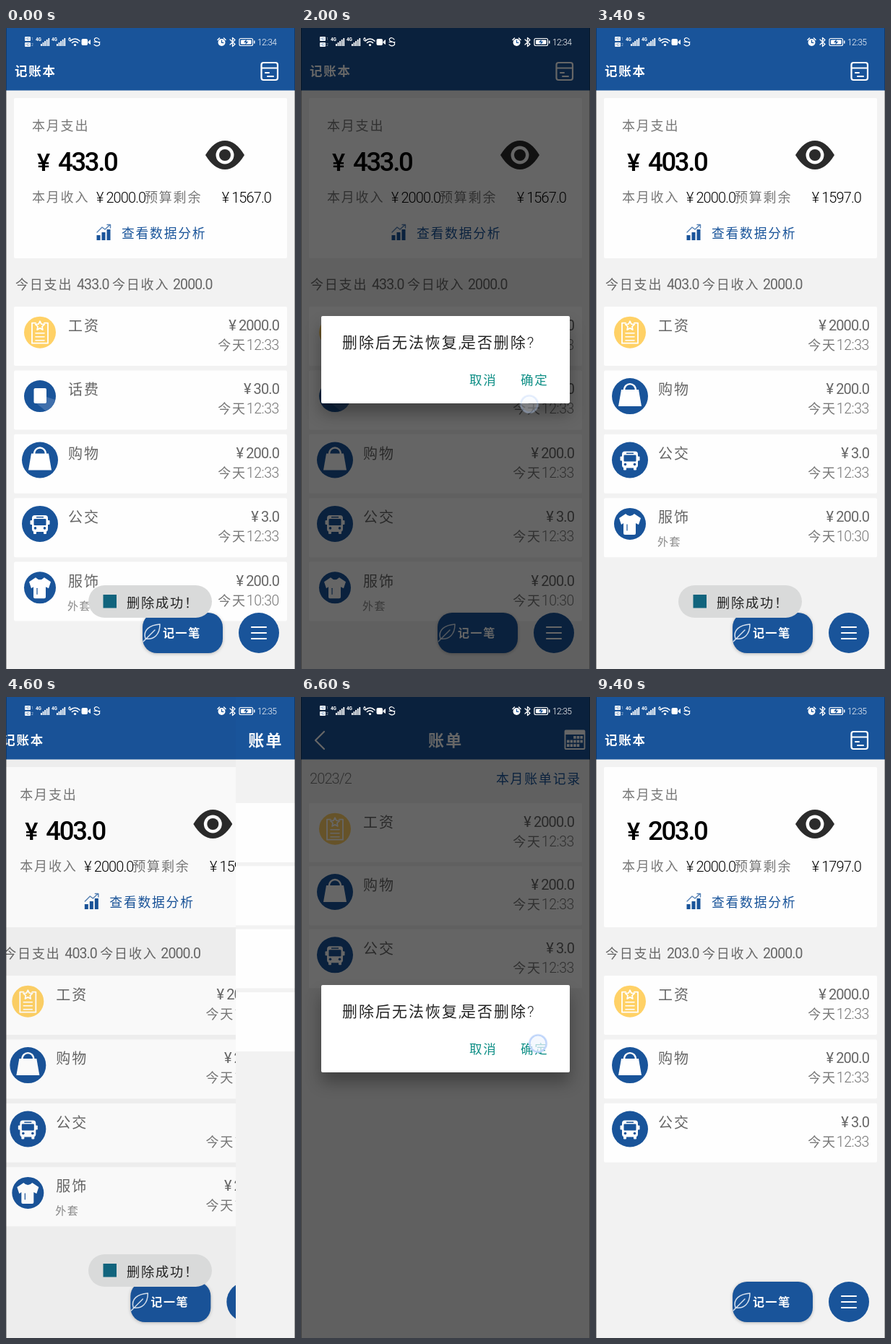
Write an HTML page that moves like this. It is 400 px wide and 888 px high and loops after 10 s.

```html
<!DOCTYPE html>
<html lang="zh">
<head>
<meta charset="utf-8">
<title>记账本</title>
<style>
html, body { margin: 0; width: 100%; height: 100%; overflow: hidden; background: #f2f2f2; }
#stage { position: relative; width: 400px; height: 888px; overflow: hidden; }
#stage > div, #bill > div, svg { position: absolute; left: 0; top: 0; width: 400px; height: 888px; }
text { font-family: "Noto Sans CJK SC", "Noto Sans CJK", sans-serif; font-weight: 300; letter-spacing: .1em; white-space: pre; }
.n { font-family: Roboto, sans-serif; letter-spacing: -.045em; }
.big .n { letter-spacing: -.064em; font-weight: 500; }
.date .n { font-size: 1.08em; letter-spacing: -.02em; }
.m { font-weight: 700; }
.r { font-weight: 400; }
.line { fill: none; stroke: #fff; stroke-linecap: round; stroke-linejoin: round; }

#home, #shade, #bill, #bill > div, #dim, #dialog, #toast, #touch, #touch g, #bulge {
  animation: 10s linear infinite;
}

/* account data before and after each deletion */
.first, .second, .third, .shift, .last, .before, .after { animation: 10s step-end infinite; }
.first { animation-name: first; }
.second { animation-name: second; }
.third { animation-name: third; }
.shift { animation-name: shift; }
.last { animation-name: last; }
.before { animation-name: before; }
.after { animation-name: after; }
@keyframes first { 0% { opacity: 1 } 25%, 100% { opacity: 0 } }
@keyframes second { 0% { opacity: 0 } 25% { opacity: 1 } 65.8%, 100% { opacity: 0 } }
@keyframes third { 0% { opacity: 0 } 65.8%, 100% { opacity: 1 } }
@keyframes last { 0% { opacity: 1 } 65.8%, 100% { opacity: 0 } }
@keyframes shift { 0% { transform: none } 25%, 100% { transform: translateY(-88.4px) } }
@keyframes before { 0% { opacity: 1 } 27%, 100% { opacity: 0 } }
@keyframes after { 0% { opacity: 0 } 27%, 100% { opacity: 1 } }

/* page change: the bill page is uncovered from the right, home drifts left */
#home { animation-name: home; }
#shade { animation-name: shade; }
#bill { animation-name: uncover; }
#bill > div { animation-name: slide; }
@keyframes home {
  0%, 45.5% { transform: none; animation-timing-function: cubic-bezier(.2, .2, .1, 1) }
  50.5%, 76.6% { transform: translateX(-82px) }
  77% { transform: translateX(-80px); animation-timing-function: cubic-bezier(.3, .1, .2, 1) }
  82%, 100% { transform: none }
}
@keyframes shade {
  0%, 45.5% { opacity: 0; animation-timing-function: cubic-bezier(.2, .2, .1, 1) }
  50.5%, 77% { opacity: .1; animation-timing-function: cubic-bezier(.3, .1, .2, 1) }
  82%, 100% { opacity: 0 }
}
@keyframes uncover {
  0%, 45.5% { clip-path: inset(0 0 0 400px); animation-timing-function: cubic-bezier(.2, .2, .1, 1) }
  50.5%, 76.6% { clip-path: inset(0 0 0 0px) }
  77% { clip-path: inset(0 0 0 10px); animation-timing-function: cubic-bezier(.3, .1, .2, 1) }
  82%, 100% { clip-path: inset(0 0 0 400px) }
}
@keyframes slide {
  0%, 45.5% { transform: translateX(200px); animation-timing-function: cubic-bezier(.2, .2, .1, 1) }
  50.5%, 76.6% { transform: none }
  77% { transform: translateX(5px); animation-timing-function: cubic-bezier(.3, .1, .2, 1) }
  82%, 100% { transform: translateX(200px) }
}

#dim { background: #000; animation-name: dim; }
@keyframes dim {
  0%, 16.6% { opacity: 0 } 19%, 24.6% { opacity: .6 } 26.8%, 59.6% { opacity: 0 }
  62%, 67% { opacity: .6 } 69.5%, 100% { opacity: 0 }
}
#stage > #dialog {
  left: 28px; top: 399px; width: 344px; height: 121px; background: #fff; border-radius: 2px;
  box-shadow: 0 14px 22px rgba(0, 0, 0, .32); animation-name: dialog;
}
#dialog svg { left: -28px; top: -399px; }
@keyframes dialog {
  0%, 16.6% { opacity: 0; transform: scale(.9) }
  19%, 24.6% { opacity: 1; transform: none }
  26.5% { opacity: 0; transform: none }
  27%, 59.6% { opacity: 0; transform: scale(.9) }
  62%, 67% { opacity: 1; transform: none }
  69%, 100% { opacity: 0; transform: none }
}
#toast { animation-name: toast; }
@keyframes toast {
  0%, 8% { opacity: 1 } 11%, 27.5% { opacity: 0 } 28.8%, 47.5% { opacity: 1 }
  50%, 70% { opacity: 0 } 71.2%, 88% { opacity: 1 } 91%, 99.99% { opacity: 0 } 100% { opacity: 1 }
}
#bulge { animation-name: bulge; transform-origin: 400px 532px; }
@keyframes bulge {
  0%, 73.6% { transform: scaleX(0) } 76.5%, 77.2% { transform: none } 80%, 100% { transform: scaleX(0) }
}
#touch { animation-name: place; }
#touch g { animation-name: press; }
@keyframes place {
  0% { transform: translate(316px, 521px); animation-timing-function: step-end }
  22% { transform: translate(324px, 488px); animation-timing-function: step-end }
  30% { transform: translate(365px, 60px); animation-timing-function: step-end }
  50% { transform: translate(263px, 452px); animation-timing-function: step-end }
  63.5% { transform: translate(328px, 480px); animation-timing-function: step-end }
  70% { transform: translate(397px, 535px); animation-timing-function: step-end }
  74% { transform: translate(397px, 535px); animation-timing-function: ease-out }
  76.5%, 100% { transform: translate(324px, 595px) }
}
@keyframes press {
  0%, 12.8% { opacity: 0 } 12.9%, 19.3% { opacity: 1 } 20% { opacity: .45 } 21%, 22.8% { opacity: 0 }
  22.9%, 24.4% { opacity: 1 } 25.3%, 43.8% { opacity: 0 } 43.9%, 45% { opacity: 1 }
  46%, 54.8% { opacity: 0 } 54.9%, 60.5% { opacity: 1 } 62%, 64.8% { opacity: 0 }
  64.9%, 66.3% { opacity: 1 } 67.4%, 73.8% { opacity: 0 } 73.9%, 77.2% { opacity: 1 } 78%, 100% { opacity: 0 }
}
</style>
</head>
<body>
<div id="stage">
  <div id="home"></div>
  <div id="bill"><div></div></div>
  <div id="dim"></div>
  <div id="dialog"></div>
  <div id="overlay"></div>
</div>
<script>
const BLUE = '#19549a', GRAY = '#777', DARK = '#666', TEAL = '#0f8f86';
const svg = body => `<svg viewBox="0 0 400 888">${body}</svg>`;
const rect = (x, y, w, h, fill, r = 0) =>
  `<rect x="${x}" y="${y}" width="${w}" height="${h}" rx="${r}" fill="${fill}"/>`;
const disc = (x, y, r, fill) => `<circle cx="${x}" cy="${y}" r="${r}" fill="${fill}"/>`;
const fill = (d, color) => `<path d="${d}" fill="${color}"/>`;
const line = (d, w = 2, color = '#fff') =>
  `<path class="line" d="${d}" stroke-width="${w}" style="stroke:${color}"/>`;
const group = (body, cls = '') => `<g class="${cls}">${body}</g>`;
const at = (x, y, body) => `<g transform="translate(${x} ${y})">${body}</g>`;
const text = (x, y, s, size, color, cls = '', anchor = 'start') =>
  `<text x="${x}" y="${y}" font-size="${size}" fill="${color}" class="${cls}" text-anchor="${anchor}">` +
  s.replace(/[ -~¥]+/g, '<tspan class="n">$&</tspan>') + '</text>';

const star = [...Array(10)].map((_, i) => {
  const r = i % 2 ? 3.2 : 6.5, a = Math.PI * (i / 5 - .5);
  return `${(r * Math.cos(a)).toFixed(1)} ${(r * Math.sin(a) - 9).toFixed(1)}`;
}).join('L');

const icons = {
  salary: disc(0, 0, 22, '#ffd166') + line('M-6-13H-11V15H11V-13H6', 1.8) + line(`M${star}Z`, 1.8) +
    line('M-6 1H6M-6 6H6M-6 11H6', 1.6),
  phone: disc(0, 0, 22, BLUE) + fill('M9 1L21 5A22 22 0 0 1 8 20.5L-5 10Z', '#3f6fac') +
    rect(-8.5, -11, 17.5, 21, '#fff', 2),
  bag: disc(0, 0, 25, BLUE) + fill('M-12-9H12L16 14H-16Z', '#fff') + line('M-8-8C-8-20 8-20 8-8', 2.4),
  bus: disc(0, 0, 25, BLUE) + rect(-11, -12, 22, 23, '#fff', 4) + rect(-13.5, -5, 27, 6, '#fff', 1) +
    rect(-8.5, -7, 17, 9, BLUE, 1) + rect(-5, -10, 10, 1.5, BLUE) + disc(-6.5, 6, 1.8, BLUE) +
    disc(6.5, 6, 1.8, BLUE) + rect(-9, 10, 4, 4, '#fff', 1) + rect(5, 10, 4, 4, '#fff', 1),
  shirt: disc(0, 0, 22, BLUE) +
    fill('M-6-14Q0-8 6-14L15-8L12 1L8-1V13Q8 15 6 15H-7Q-9 15-9 13V-1L-12 1L-15-8Z', '#fff') +
    line('M-4 1V9', 1.2, BLUE)
};

const entries = [
  ['salary', '工资', '2000.0', '12:33'],
  ['phone', '话费', '30.0', '12:33'],
  ['bag', '购物', '200.0', '12:33'],
  ['bus', '公交', '3.0', '12:33'],
  ['shirt', '服饰', '200.0', '10:30', '外套']
];
const row = ([icon, name, sum, time, note], y) => at(0, y,
  rect(11, 0, 378, 82, '#fefefe', 2) + at(47, 35.7, icons[icon]) +
  text(86, 34, name, 20, DARK, 'r') +
  text(378, 33, `¥ ${sum}`, 20, DARK, 'r', 'end') +
  text(378, 60, `今天${time}`, 18, GRAY, 'date', 'end') +
  (note ? text(85, 66, note, 15, '#888') : ''));

// one label per account state
const states = (a, b, c, draw) =>
  group(draw(a), 'first') + group(draw(b), 'second') + group(draw(c), 'third');

// pages reach past both edges while they move
const page = rect(-200, 0, 800, 888, '#f2f2f2') + rect(-200, 0, 800, 86.5, BLUE);

const summary = rect(11, 97, 378, 222, '#fefefe', 2) +
  text(36, 142, '本月支出', 18, GRAY) +
  `<g class="big">${text(43, 198, '¥', 34, '#000')}` +
  states('433.0', '403.0', '203.0', s => text(72, 198, s, 36.5, '#000')) + '</g>' +
  fill('M276 176Q288 156 303 156T330 176Q318 196 303 196T276 176Z', '#2b2b2b') +
  disc(303, 176, 12.5, '#fff') + disc(303, 176, 8, '#2b2b2b') +
  text(36, 241, '本月收入', 18, GRAY) + text(125, 242, '¥ 2000.0', 20, '#000') +
  text(192, 241, '预算剩余', 18, GRAY) +
  states('1567.0', '1597.0', '1797.0', s => text(367, 242, `¥ ${s}`, 20, '#000', '', 'end')) +
  rect(125.5, 287, 5, 7, BLUE) + rect(132.5, 283, 5, 11, BLUE) + rect(139.5, 279, 5, 15, BLUE) +
  line('M126 283L133 276L137 279L144 272.5M140 272.5H144.5V277', 1.4, '#5581b5') +
  text(160, 291, '查看数据分析', 17.8, BLUE);

const today = text(13, 362, '今日支出', 18, DARK, 'r') +
  states('433.0', '403.0', '203.0', s => text(98, 362, s, 19.5, DARK, 'r')) +
  text(147, 362, '今日收入', 18, DARK, 'r') + text(231, 362, '2000.0', 19.5, DARK, 'r');

const buttons = `<g style="filter:drop-shadow(0 1px 2px rgba(0,0,0,.25))">${
  rect(189, 810, 111, 56, BLUE, 20)}</g>` + disc(350, 838, 28, BLUE) +
  line('M340 830H360M340 838H360M340 846H360', 2.2) +
  line('M190 850L206 834M193 846C189 834 199 827 213 826C213 840 205 848 193 846', 1.5, '#d5e0ee') +
  text(217, 844, '记一笔', 16, '#fff', 'm');

const rowClass = ['', 'first', 'shift', 'shift', 'shift'];
const homeRows = entries.map((e, i) => {
  const body = row(e, 386 + i * 88.4);
  return group(i === 4 ? group(body, 'last') : body, rowClass[i]);
}).join('');

document.querySelector('#home').innerHTML = svg(page +
  text(12, 66, '记账本', 17.5, '#fff', 'm') +
  '<rect class="line" x="353.5" y="48" width="22.5" height="24" rx="3" stroke-width="2.2"/>' +
  line('M354 55.5H376M359 62H364M362 67H370', 2) +
  summary + today + homeRows + buttons +
  '<rect id="shade" width="400" height="888"/>');

// calendar squares: first and last column of each line
const days = [[2, 5], [0, 5], [0, 4]].map(([from, to], r) => {
  let cells = '';
  for (let c = from; c < to; c++) cells += rect(368 + c * 4.6, 54 + r * 5.6, 3.5, 3.8, '#fff');
  return cells;
}).join('');
const billRows = entries.filter(e => e[0] !== 'phone')
  .map((e, i) => group(row(e, 147 + i * 87.3), i === 3 ? 'last' : '')).join('');

document.querySelector('#bill > div').innerHTML = svg(page +
  line('M32 48L20 60L32 72', 2.2) + text(176, 68, '账单', 22, '#fff', 'm') +
  '<rect class="line" x="365.5" y="46.5" width="27" height="25.5" rx="1" stroke-width="1.8"/>' +
  rect(365, 46, 28, 6, '#fff', 1) + days +
  text(12, 120, '2023/2', 20, GRAY) + text(388, 120, '本月账单记录', 17.9, BLUE, '', 'end') +
  billRows);

document.querySelector('#dialog').innerHTML = svg(
  text(57, 443, '删除后无法恢复,是否删除?', 20.9, '#222') +
  text(233, 494, '取消', 17.5, TEAL, 'r') + text(304, 494, '确定', 17.5, TEAL, 'r'));

const signal = x => [0, 1, 2, 3, 4].map(i => rect(x + i * 2.6, 22 - i * 2, 1.8, 3 + i * 2, '#fff')).join('');
const status = [12, 20].map(y => rect(26, y, 8, 6, '#fff', 1) + text(26.5, y + 5, 'HD', 5, BLUE) +
    text(35, y + 5, y < 15 ? '1' : '2', 5, '#fff')).join('') +
  text(41, 18, '4G', 6.5, '#fff', 'm') + signal(48) + text(63, 18, '4G', 6.5, '#fff', 'm') + signal(70) +
  text(86, 18, '6', 7, '#fff', 'm') +
  line('M89 18Q95.5 12 102 18M91.5 20.5Q95.5 17 99.5 20.5', 1.6) + disc(95.5, 23.5, 1.6, '#fff') +
  rect(104.5, 15, 8.5, 9, '#fff', 2) + fill('M113.5 19L117 16V23L113.5 20.5Z', '#fff') +
  line('M129 16Q126 12 122.5 15Q121.5 18 126 19Q130.5 20 129.5 23Q126 26.5 122 23M122 19.5H130', 1.2) +
  disc(298.5, 20, 5, '#fff') + line('M298.5 17V20.3H301', 1.2, BLUE) +
  line('M293 16.5L295.5 14M304 16.5L301.5 14', 1.5) +
  line('M310 16L317 22.5L313.5 25.5V13.5L317 16.5L310 23', 1.3) +
  '<rect class="line" x="323" y="14.5" width="18.5" height="10" rx="2" stroke-width="1.2"/>' +
  rect(325, 16.5, 14.5, 6, '#fff', 1) + rect(343, 17.5, 1.5, 4, '#fff') +
  fill('M333 15.5L329 20H332L331 23.5L335.5 18.8H332.5Z', BLUE) +
  group(text(348, 24, '12:34', 12, '#fff'), 'before') + group(text(348, 24, '12:35', 12, '#fff'), 'after');

const edges = rect(0, 0, 1, 888, 'rgba(0,0,0,.3)') + rect(399, 0, 1, 888, 'rgba(0,0,0,.3)');

document.querySelector('#overlay').innerHTML = svg(edges +
  `<g id="bulge">${fill('M400 457C398 488 374 497 374 532S398 576 400 607Z', '#555')}${
    line('M391.5 524L384 532L391.5 540', 2)}</g>` +
  `<g id="toast">${rect(114, 772, 171, 45, '#d9dada', 22.5)}${rect(134.5, 785, 18.5, 18.5, '#11647d')}${
    text(167, 802.5, '删除成功！', 18.2, '#222')}</g>` +
  '<g id="touch"><g>' + disc(0, 0, 13.5, 'rgba(190,212,250,.35)') +
  '<circle r="11.5" fill="rgba(255,255,255,.55)" stroke="#bfd5fa" stroke-width="2.2"/></g></g>' +
  status);
</script>
</body>
</html>
```
